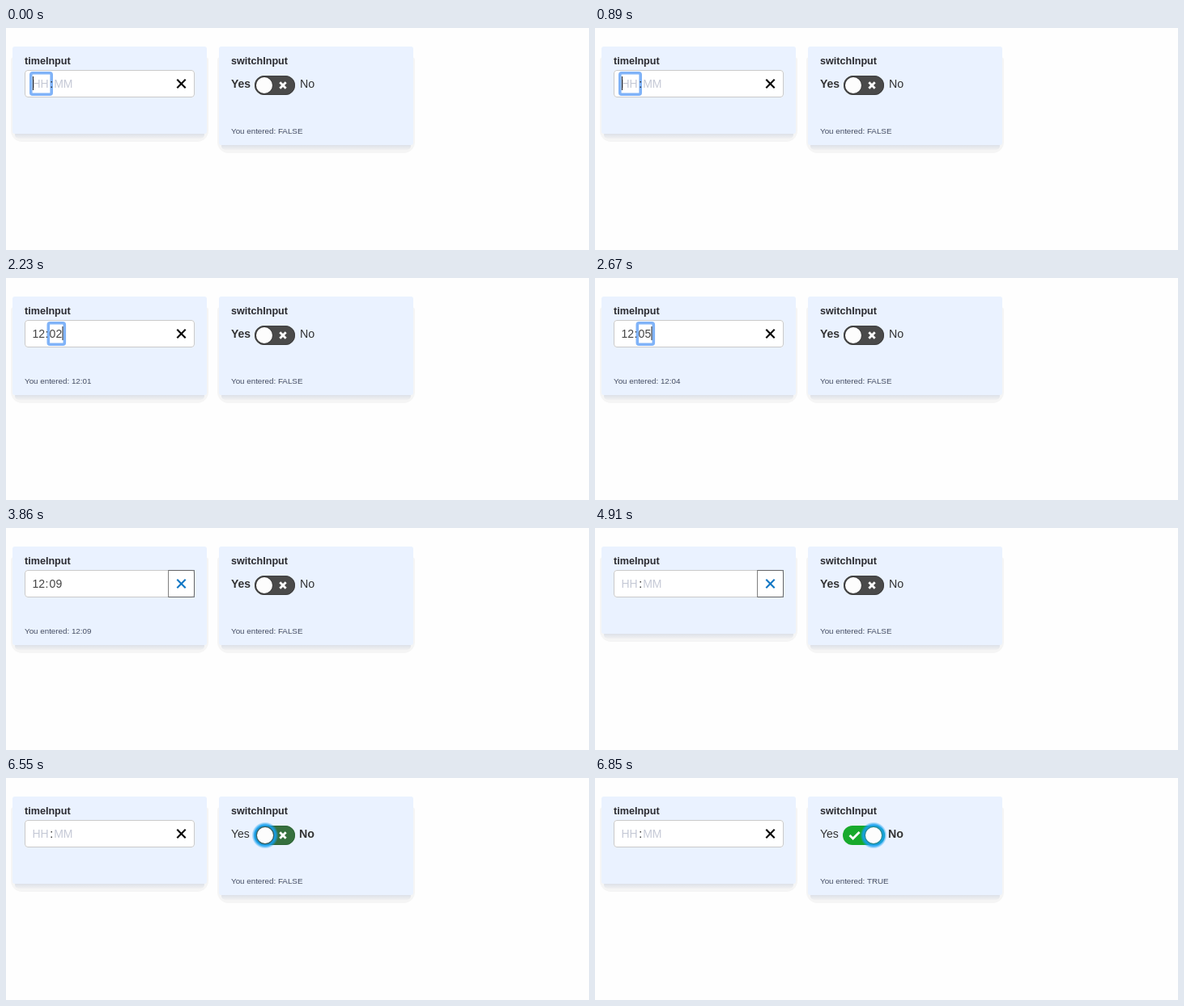
An HTML page with a canvas that plays this animation: 720x275 px, repeating every 7.9 s.

```html
<!DOCTYPE html>
<html lang="en">
<head>
<meta charset="utf-8">
<title>Form inputs</title>
<style>
  html, body { margin: 0; width: 100%; height: 100%; overflow: hidden; background: #fefefe; }
  canvas { display: block; width: 720px; height: 275px; }
</style>
</head>
<body>
<canvas id="stage"></canvas>
<script>
const LOOP = 7900;
const FONT = '"Liberation Sans", Arial, sans-serif';
const canvas = document.getElementById('stage');
const ctx = canvas.getContext('2d');
const dpr = window.devicePixelRatio || 1;
canvas.width = 720 * dpr;
canvas.height = 275 * dpr;

// Each step changes part of the state from its time on.
const steps = [
  [0, { focus: 'hour', caret: true, hour: '', minute: '', entered: '', knob: 0, glow: 0, on: 0, answer: 'FALSE' }],
  [300, { caret: false }],
  [890, { caret: true }],
  [1190, { focus: 'minute', hour: '12' }],
  [1790, { caret: false }],
  [2230, { caret: true, minute: '02', entered: '12:01' }],
  [2380, { minute: '03', entered: '12:02' }],
  [2520, { minute: '04', entered: '12:03' }],
  [2670, { minute: '05', entered: '12:04' }],
  [2820, { entered: '12:05' }],
  [2960, { minute: '07', entered: '12:06' }],
  [3110, { minute: '08', entered: '12:07' }],
  [3260, { minute: '09', entered: '12:09' }],
  [3410, { caret: false }],
  [3860, { focus: 'clear' }],
  [4910, { hour: '', minute: '', entered: '' }],
  [5660, { focus: 'switch', glow: 0.5 }],
  [5800, { glow: 1 }],
  [6550, { on: 0.4, knob: 0.04 }],
  [6700, { on: 1, knob: 0.44, answer: 'TRUE' }],
  [6850, { knob: 1 }]
];

function stateAt(t) {
  return Object.assign({}, ...steps.filter(([at]) => at <= t).map(([, change]) => change));
}

function text(str, x, y, size, color, weight = 'normal') {
  ctx.font = `${weight} ${size}px ${FONT}`;
  ctx.fillStyle = color;
  ctx.fillText(str, x, y);
}

function box(x, y, w, h, r) {
  ctx.beginPath();
  ctx.roundRect(x, y, w, h, r);
}

function fillBox(x, y, w, h, r, color) {
  box(x, y, w, h, r);
  ctx.fillStyle = color;
  ctx.fill();
}

function strokeBox(x, y, w, h, r, color, width) {
  box(x, y, w, h, r);
  ctx.strokeStyle = color;
  ctx.lineWidth = width;
  ctx.stroke();
}

function line(points, color, width) {
  ctx.beginPath();
  points.forEach(([x, y]) => ctx.lineTo(x, y));
  ctx.strokeStyle = color;
  ctx.lineWidth = width;
  ctx.stroke();
}

function cross(x, y, r, color, width) {
  line([[x - r, y - r], [x + r, y + r]], color, width);
  line([[x + r, y - r], [x - r, y + r]], color, width);
}

function mix(a, b, k) {
  return `rgb(${a.map((v, i) => Math.round(v + (b[i] - v) * k))})`;
}

function card(x, bottom, title, note) {
  fillBox(x - 2, 36, 244, bottom - 26, [4, 4, 14, 14], '#f5f5f5');
  const shade = ctx.createLinearGradient(0, bottom, 0, bottom + 6);
  shade.addColorStop(0, '#dde1e8');
  shade.addColorStop(1, '#f1f1f2');
  fillBox(x + 3, bottom - 4, 234, 10, 5, shade);
  fillBox(x, 23, 240, bottom - 23, 3, '#eaf2ff');
  text(title, x + 15, 45, 12.6, '#2b2b30', 'bold');
  if (note) text('You entered: ' + note, x + 15, 131, 9.8, '#454d63');
}

function timeField(s) {
  const pale = '#c5c9d6', dark = '#444';
  const colonX = s.hour ? 48.6 : 54.2;
  const minuteX = s.hour ? 53.6 : 59.2;
  const clearing = s.focus === 'clear';

  fillBox(23, 52, 210, 34, 4, '#fff');
  strokeBox(23.5, 52.5, 209, 33, 3.5, '#cacaca', 1);
  text(s.hour || 'HH', 32.4, 74, 14, s.hour ? dark : pale);
  text(s.minute || 'MM', minuteX, 74, 14, s.minute ? dark : pale);

  if (s.focus === 'hour') strokeBox(30.8, 55.8, 25.4, 26.4, 2, '#80b3f8', 3.6);
  if (s.focus === 'minute') {
    strokeBox(52.3, 55.8, s.minute ? 20 : 28.8, 26.4, 2, '#80b3f8', 3.6);
  }
  text(':', colonX, 74, 14, s.hour ? dark : '#222');
  if (s.caret) {
    const caretX = s.focus === 'hour' ? 33 : s.minute ? 69.5 : 54;
    ctx.fillStyle = '#222';
    ctx.fillRect(caretX, 60, 1, 17);
  }

  cross(216.5, 69, 5.2, clearing ? '#0f76c4' : '#000', 2.1);
  if (clearing) {
    fillBox(200, 52, 1, 34, 0, '#fff');
    ctx.setLineDash([1, 1]);
    strokeBox(200.5, 52.5, 32, 33, 0, '#000', 1);
    ctx.setLineDash([]);
  }
}

function toggle(s) {
  const x = 319 + 25 * s.knob, y = 71;
  const yes = s.on > 0;
  text('Yes', 278, 74, 14, '#333', yes ? 'normal' : 'bold');
  text('No', yes ? 362 : 363, 74, 14.2, '#333', yes ? 'bold' : 'normal');

  const grow = s.on === 1 ? 1 : 0;
  fillBox(307 - grow, 59, 50 + 2 * grow, 24, 12, mix([74, 74, 74], [24, 170, 44], s.on));
  if (s.on < 1) {
    strokeBox(307.5, 59.5, 49, 23, 11.5, mix([62, 62, 62], [24, 160, 42], s.on), 1);
    cross(342, y, 3.7, '#fff', 2.8);
  } else {
    line([[314.5, 71], [318.6, 75], [326.6, 67]], '#fff', 2.8);
  }

  if (s.glow) {
    const reach = 12 + 4.5 * s.glow;
    const halo = ctx.createRadialGradient(x, y, 10, x, y, reach);
    halo.addColorStop(0, `rgba(20,160,240,${s.glow})`);
    halo.addColorStop(0.5, `rgba(20,160,240,${0.85 * s.glow})`);
    halo.addColorStop(1, 'rgba(20,160,240,0)');
    ctx.beginPath();
    ctx.arc(x, y, reach, 0, 2 * Math.PI);
    ctx.fillStyle = halo;
    ctx.fill();
  }
  ctx.beginPath();
  ctx.arc(x, y, 10.6, 0, 2 * Math.PI);
  ctx.fillStyle = '#fdfdfd';
  ctx.fill();
  ctx.strokeStyle = mix([66, 66, 66], [40, 140, 150], s.on);
  ctx.lineWidth = 1.2;
  ctx.stroke();
}

function draw(now) {
  const s = stateAt(now % LOOP);
  ctx.setTransform(dpr, 0, 0, dpr, 0, 0);
  ctx.fillStyle = '#fefefe';
  ctx.fillRect(0, 0, 720, 275);
  card(8, s.entered ? 145 : 131, 'timeInput', s.entered);
  card(263, 145, 'switchInput', s.answer);
  timeField(s);
  toggle(s);
}

const start = performance.now();
function tick() {
  draw(performance.now() - start);
  requestAnimationFrame(tick);
}
tick();
</script>
</body>
</html>
```
